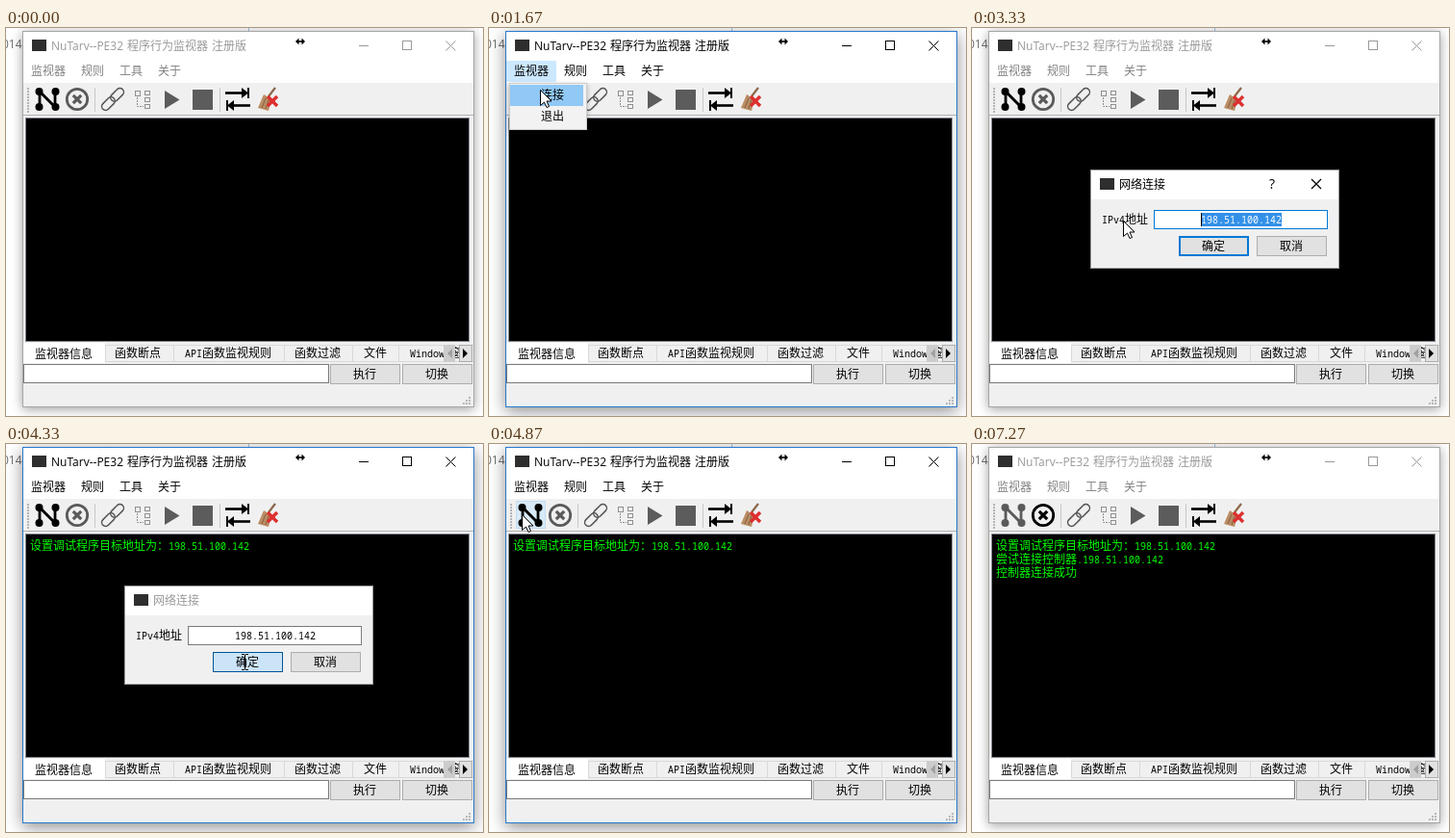
Recreate the animation shown at these times as an HTML page with a canvas. Size 496 px wide and 403 px high, loop 7340 ms.

```html
<!DOCTYPE html>
<html lang="zh-CN">
<head>
<meta charset="utf-8">
<title>程序行为监视器</title>
<style>
html, body { margin: 0; width: 100%; height: 100%; overflow: hidden; background: #fff; }
canvas { display: block; width: 496px; height: 403px; }
</style>
</head>
<body>
<canvas id="stage" width="496" height="403"></canvas>
<script>
const ctx = document.getElementById('stage').getContext('2d');
const LOOP = 7340, TICK = 1000 / 15;
const CJK = '"Noto Sans CJK SC", "Noto Sans CJK JP", "Noto Sans CJK", sans-serif';
const UI = '"Open Sans", "Noto Sans", ' + CJK;
const MONO = '"Noto Sans Mono", "Liberation Mono", monospace';
const ADDRESS = '198.51.100.142';
const CONSOLE = [21, 94, 460, 231], FIELD = [189, 189, 181, 20];

// Pointer track: tick, x, y
const TRACK = [
  [6, 262, 217], [14, 44, 42], [17, 44, 42], [22, 54, 66], [25, 53, 64], [27, 53, 64],
  [33, 338, 228], [36, 344, 211], [40, 332, 198], [43, 332, 198], [50, 157, 200],
  [51, 157, 200], [60, 247, 226], [65, 248, 226], [73, 34, 73], [87, 34, 73],
  [90, 259, 183], [109, 259, 183]
];

function pointer(tick) {
  if (tick < 6 || tick >= 109) return null;
  const i = TRACK.findIndex(k => k[0] > tick);
  const [t0, x0, y0] = TRACK[i - 1], [t1, x1, y1] = TRACK[i];
  const u = (tick - t0) / (t1 - t0), e = u * u * (3 - 2 * u);
  return { x: Math.round(x0 + (x1 - x0) * e), y: Math.round(y0 + (y1 - y0) * e) };
}

const within = (p, [x, y, w, h]) => p && p.x >= x && p.x < x + w && p.y >= y && p.y < y + h;

function fill(color, x, y, w, h) {
  ctx.fillStyle = color;
  ctx.fillRect(x, y, w, h);
}

function frame(color, x, y, w, h, lw = 1) {
  ctx.strokeStyle = color;
  ctx.lineWidth = lw;
  ctx.strokeRect(x + lw / 2, y + lw / 2, w - lw, h - lw);
}

function line(color, lw, ...pts) {
  ctx.strokeStyle = color;
  ctx.lineWidth = lw;
  ctx.beginPath();
  for (let i = 0; i < pts.length; i += 2) ctx.lineTo(pts[i], pts[i + 1]);
  ctx.stroke();
}

function poly(color, ...pts) {
  ctx.fillStyle = color;
  ctx.beginPath();
  for (let i = 0; i < pts.length; i += 2) ctx.lineTo(pts[i], pts[i + 1]);
  ctx.closePath();
  ctx.fill();
}

function label(s, x, y, color, font = UI, size = 12) {
  ctx.fillStyle = color;
  ctx.font = size + 'px ' + font;
  ctx.fillText(s, x, y);
}

// Half-width Latin next to full-width Chinese
function mixed(s, x, y, color) {
  for (const run of s.match(/[\x00-\x7f]+|[^\x00-\x7f]+/g)) {
    const latin = run.charCodeAt(0) < 128;
    label(run, x, y, color, latin ? MONO : CJK, latin ? 10 : 12);
    x += run.length * (latin ? 6 : 12);
  }
}

function shadowBox(x, y, w, h, blur, alpha, dy) {
  ctx.save();
  ctx.shadowColor = `rgba(0,0,0,${alpha})`;
  ctx.shadowBlur = blur;
  ctx.shadowOffsetY = dy;
  fill('#f0f0f0', x, y, w, h);
  ctx.restore();
}

function cross(color, lw, x, y, r) {
  line(color, lw, x - r, y - r, x + r, y + r);
  line(color, lw, x + r, y - r, x - r, y + r);
}

function button(s, x, y, w, h, bg = '#e1e1e1', edge = '#adadad', lw = 1) {
  fill(bg, x, y, w, h);
  frame(edge, x, y, w, h, lw);
  mixed(s, x + Math.floor((w - 1 - s.length * 12) / 2), y + 15, '#000');
}

function backdrop() {
  fill('#fff', 0, 0, 496, 403);
  label('014/', -4, 21, '#6d6d6d');
  label('程序记录文件说明演示目录', 104, -1, '#4a5a68', CJK);
  fill('#9cc3e0', 252, 0, 1, 3);
}

function titleBar(active) {
  const ink = active ? '#000' : '#999';
  fill('#fff', 18, 4, 468, 53);
  fill('#2e2e2e', 27, 12, 15, 12);
  label('NuTarv--PE32', 47, 23, ink);
  label('程序行为监视器', 126, 23, ink, CJK);
  label('注册版', 214, 23, ink, CJK);
  line(ink, 1, 367, 18.5, 377, 18.5);
  frame(ink, 412, 13, 10, 10);
  cross(ink, 1, 462.5, 18.5, 5);
}

function menuBar(active, lit) {
  if (lit) fill('#cce8ff', 18, 34, 52, 22);
  ['监视器', '规则', '工具', '关于'].forEach((s, i) =>
    label(s, [26, 78, 118, 158][i], 49, active ? '#000' : '#808080', CJK));
}

function netIcon(color) {
  line(color, 2.8, 35, 82, 35, 66, 51, 82, 51, 66);
  ctx.fillStyle = color;
  for (const x of [34.5, 51.5]) for (const y of [66, 82]) {
    ctx.beginPath();
    ctx.arc(x, y, 4, 0, 7);
    ctx.fill();
  }
}

function stopIcon(color) {
  ctx.strokeStyle = color;
  ctx.lineWidth = 2.8;
  ctx.beginPath();
  ctx.arc(74, 74, 10.7, 0, 7);
  ctx.stroke();
  cross(color, 3.2, 74, 74, 4.2);
}

function linkIcon() {
  ctx.save();
  ctx.translate(111, 74);
  ctx.rotate(-Math.PI / 4);
  ctx.strokeStyle = '#555';
  ctx.lineWidth = 1.5;
  for (const x of [-14.5, -1.5]) {
    ctx.beginPath();
    ctx.roundRect(x, -4, 16, 8, 4);
    ctx.stroke();
  }
  ctx.restore();
}

function treeIcon() {
  const c = '#8f8f8f';
  frame(c, 134, 65, 6, 6);
  for (const y of [65, 72, 79]) frame(c, 144, y, 6, 5);
  ctx.setLineDash([2, 1]);
  line(c, 1, 136.5, 72, 136.5, 81.5, 143, 81.5);
  ctx.setLineDash([]);
}

function swapIcon() {
  line('#000', 2.6, 228, 67.5, 247, 67.5);
  poly('#000', 245, 62, 252, 67.5, 245, 73);
  fill('#000', 251, 62, 2, 11);
  line('#000', 2.6, 235, 80.5, 254, 80.5);
  poly('#000', 237, 75, 230, 80.5, 237, 86);
  fill('#000', 229, 75, 2, 11);
}

function broomIcon() {
  line('#8b6748', 2.2, 280, 62, 273, 71);
  poly('#b98c63', 268, 69, 276, 74, 273, 86, 262, 83);
  line('#876143', 1, 270, 73, 266, 83);
  line('#876143', 1, 273, 75, 270, 84);
  cross('#dd2f2f', 3.4, 277, 76, 5);
}

function toolBar(connected, hover, pressed) {
  fill('#f0f0f0', 18, 57, 468, 34);
  fill('#b0b0b0', 18, 90, 468, 1);
  for (let y = 62; y < 88; y += 3) fill('#b4b4b4', 22, y, 2, 2);
  if (hover || pressed) {
    fill(pressed ? '#b9d9f3' : '#d8e9f7', 28, 59, 31, 29);
    frame(pressed ? '#90c8f6' : '#c0dcf3', 28, 59, 31, 29);
  }
  netIcon(connected ? '#5a5a5a' : '#000');
  stopIcon(connected ? '#000' : '#5a5a5a');
  fill('#c8c8c8', 92, 62, 1, 25);
  linkIcon();
  treeIcon();
  poly('#5c5c5c', 165, 65, 180.5, 74.5, 165, 84);
  fill('#5c5c5c', 194, 64, 21, 21);
  fill('#c8c8c8', 222, 62, 1, 25);
  swapIcon();
  broomIcon();
}

function consoleView(lines) {
  frame('#828790', 20, 93, 462, 233);
  fill('#000', ...CONSOLE);
  lines.forEach((s, i) => mixed(s, 25, 110 + 14 * i, '#00ff00'));
}

function tabs() {
  fill('#f0f0f0', 18, 328, 468, 20);
  fill('#d9d9d9', 103, 329, 383, 1);
  fill('#d9d9d9', 103, 346, 383, 1);
  fill('#fff', 18, 327, 85, 21);
  for (const x of [103, 174, 289, 360, 408]) fill('#d9d9d9', x, 329, 1, 18);
  mixed('监视器信息', 30, 343, '#000');
  ['函数断点', 'API函数监视规则', '函数过滤', '文件', 'Window 窗口'].forEach((s, i) =>
    mixed(s, [113, 186, 300, 372, 420][i], 342, '#000'));
  fill('#cccccc', 455, 329, 12, 18);
  poly('#a0a0a0', 464, 333, 464, 343, 459, 338);
  fill('#e1e1e1', 471, 329, 14, 18);
  frame('#adadad', 471, 329, 14, 18);
  poly('#000', 475, 333, 475, 343, 480, 338);
}

function bottomBar() {
  fill('#fff', 18, 349, 318, 20);
  frame('#7a7a7a', 18, 349, 318, 20);
  button('执行', 337, 349, 73, 21);
  button('切换', 412, 349, 73, 21);
  for (let i = 0; i < 3; i++)
    for (let j = 0; j <= i; j++) fill('#b8b8b8', 481 - 3 * j, 383 + 3 * i, 2, 2);
}

function popup(lit) {
  shadowBox(21, 57, 81, 49, 5, 0.3, 2);
  fill('#f2f2f2', 21, 57, 81, 49);
  frame('#cccccc', 21, 57, 81, 49);
  if (lit) fill('#90c8f6', 22, 59, 76, 22);
  label('连接', 54, 74, '#000', CJK);
  label('退出', 54, 96, '#000', CJK);
}

function addressField(tick, p) {
  const focus = tick >= 44 && tick < 60;
  const hover = tick >= 32 && tick < 44;
  fill('#fff', ...FIELD);
  frame(focus ? '#0078d7' : hover ? '#171717' : '#7a7a7a', ...FIELD);
  mixed(ADDRESS, 238, 203, '#000');
  if (!focus) return;
  const reach = tick >= 50 ? 238 : Math.max(238, Math.min(322, p.x));
  const from = 238 + Math.round((reach - 238) / 6) * 6;
  ctx.save();
  ctx.beginPath();
  ctx.rect(from, 192, 322 - from, 14);
  ctx.clip();
  fill('#3390e8', from, 192, 322 - from, 14);
  mixed(ADDRESS, 238, 203, '#fff');
  ctx.restore();
  fill('#000', from, 192, 1, 14);
}

function dialog(tick, p) {
  const active = tick < 63;
  const ink = active ? '#000' : '#999';
  fill('#f0f0f0', 124, 148, 257, 101);
  fill('#fff', 124, 148, 257, 30);
  frame('#9a9a9a', 123, 147, 259, 103);
  fill('#2e2e2e', 133, 156, 15, 12);
  label('网络连接', 153, 167, ink, CJK);
  if (active) {
    label('?', 309, 167, ink, UI, 14);
    cross(ink, 1.2, 358, 162, 5);
  }
  mixed('IPv4地址', 135, 203, '#000');
  addressField(tick, p);
  if (tick >= 60) button('确定', 215, 216, 73, 21, '#cce4f7', '#005499');
  else button('确定', 215, 216, 73, 21, tick === 59 ? '#e5f1fb' : '#e1e1e1', '#0078d7', 2);
  if (tick >= 33 && tick < 36) button('取消', 296, 216, 73, 21, '#e5f1fb', '#0078d7');
  else if (tick >= 36 && tick < 38) button('取消', 296, 216, 73, 21, '#e2e6ea', '#86a9c4');
  else button('取消', 296, 216, 73, 21);
}

function resizeMark() {
  line('#000', 1.6, 303, 14, 309, 14);
  poly('#000', 301, 14, 304.5, 10.5, 304.5, 17.5);
  poly('#000', 311, 14, 307.5, 10.5, 307.5, 17.5);
}

function arrow({ x, y }) {
  ctx.save();
  ctx.translate(x + 0.5, y + 0.5);
  poly('#fff', 0, 0, 0, 16, 4, 12.5, 6.5, 18, 9, 17, 6.5, 11.5, 11.5, 11.5);
  ctx.strokeStyle = '#000';
  ctx.lineWidth = 1;
  ctx.stroke();
  ctx.restore();
}

function beam({ x, y }, color) {
  fill(color, x, y - 7, 1, 15);
  for (const dy of [-8, 8]) {
    fill(color, x - 3, y + dy, 3, 1);
    fill(color, x + 1, y + dy, 3, 1);
  }
}

function draw(tick) {
  const p = pointer(tick);
  const active = (tick >= 17 && tick < 28) || (tick >= 63 && tick < 108);
  const open = tick >= 28 && tick < 66;
  const connected = tick >= 84;
  const lines = [];
  if (tick >= 63) lines.push('设置调试程序目标地址为：' + ADDRESS);
  if (connected) lines.push('尝试连接控制器.' + ADDRESS, '控制器连接成功');

  backdrop();
  shadowBox(17, 3, 470, 391, active ? 16 : 11, active ? 0.45 : 0.38, active ? 4 : 2);
  titleBar(active);
  menuBar(active, tick >= 13 && tick < 27);
  toolBar(connected, tick >= 73 && tick < 84, tick >= 81 && tick < 84);
  consoleView(lines);
  tabs();
  bottomBar();
  frame(active ? '#2a78cc' : '#a6a6a6', 17, 3, 470, 391);
  if (tick >= 18 && tick < 27) popup(tick >= 21);
  if (open) dialog(tick, p);
  resizeMark();

  if (!p) return;
  if (open && (tick >= 63 || within(p, FIELD))) beam(p, '#000');
  else if (!open && within(p, CONSOLE)) beam(p, '#fff');
  else arrow(p);
}

const start = performance.now();
function loop() {
  const t = (performance.now() - start) % LOOP;
  draw(Math.min(109, Math.floor((t + 5) / TICK)));
  requestAnimationFrame(loop);
}
loop();
</script>
</body>
</html>
```
